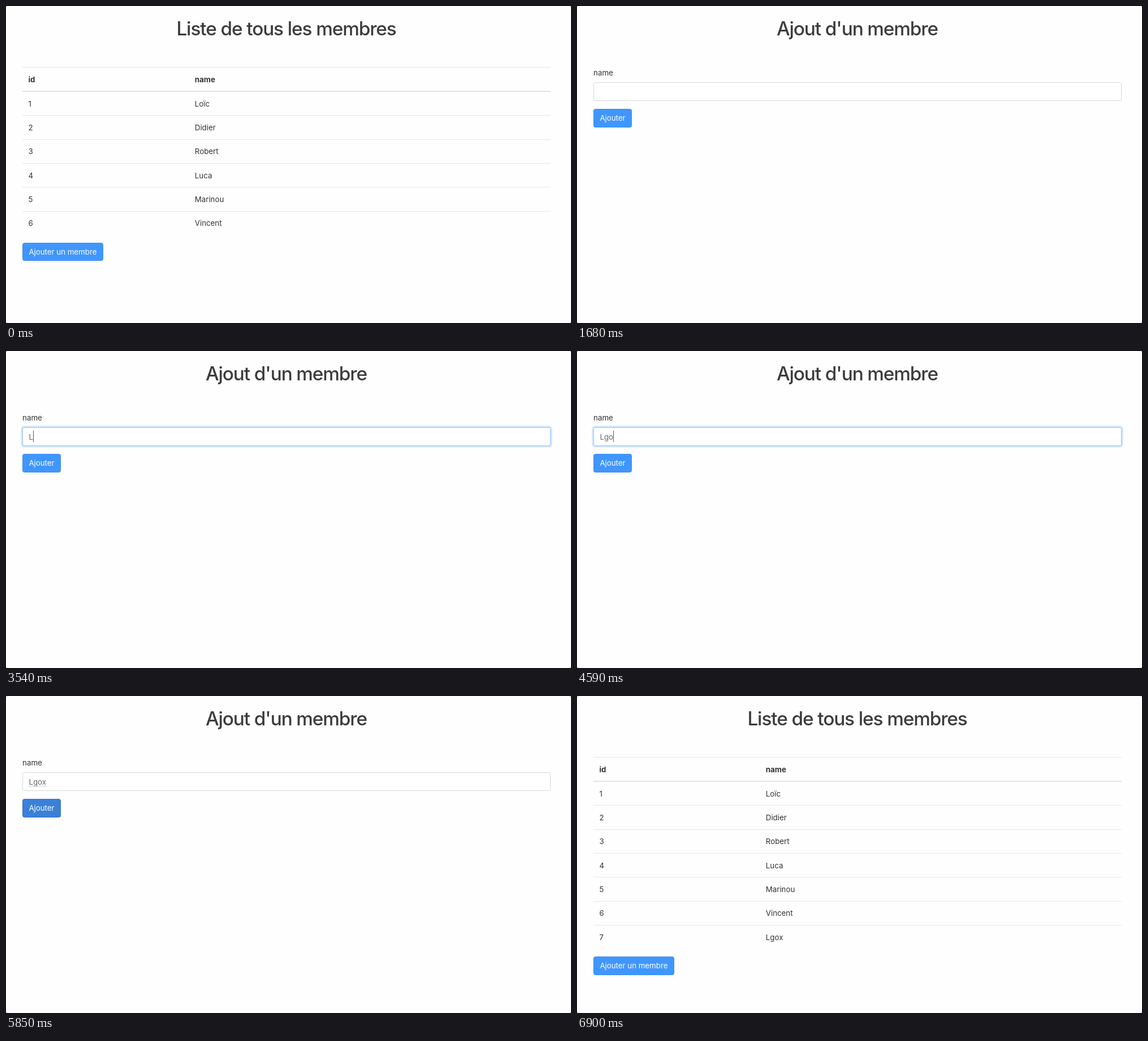
Animation of 999x561 px, one loop 7530 ms. Source, as an HTML page:

```html
<!DOCTYPE html>
<html lang="fr">
<head>
<meta charset="utf-8">
<title>Membres</title>
<style>
  html, body { margin: 0; width: 100%; height: 100%; overflow: hidden; background: #8c8c8c; }
  #stage {
    position: absolute; left: 0; top: 0; width: 999px; height: 561px;
    overflow: hidden; border-radius: 3px; background: #fefefe; color: #333;
    font: 13.35px/20px Inter, "Open Sans", sans-serif;
    font-optical-sizing: none; letter-spacing: -0.03px; white-space: pre;
  }
  #stage div, #stage i { position: absolute; box-sizing: border-box; }
  .title {
    left: 0; top: 20px; width: 991px; text-align: center; color: #3c3c3e;
    font-size: 33.35px; font-weight: 500; line-height: 40px; letter-spacing: -1.1px;
  }
  .bold { font-weight: 700; }
  .rule { left: 29px; width: 934px; height: 1px; background: #e4e6e8; }
  .button {
    left: 29px; height: 32.8px; border: 1px solid; border-radius: 3.5px;
    padding-left: 10.4px; line-height: 31.4px; color: #fff;
  }
  #field {
    left: 29px; top: 135.4px; width: 934px; height: 32.8px;
    border: 1px solid; border-radius: 3.5px; background: #fff;
  }
  #typed { left: 40.4px; top: 142px; color: #65686b; }
  #caret { left: 100%; top: -1px; width: 1px; height: 20px; background: #555; }
  #dots { left: 0; right: 0; top: 17px; height: 1px; border-top: 1px dotted #999; }
</style>
</head>
<body>
<div id="stage"></div>
<script>
const LOOP = 7530, STEP = 30, ROW = 42.33;
const FORM_OPENS = 1680, FORM_SENT = 5880;
const HOVER_LIST = 1050, HOVER_FORM = 5580, FOCUS = 2640, BLUR = 5700, FADE = 150;
const WORD = "Lgox";
const KEYS = [3540, 3960, 4170, 4770];
const CARET_ON = [[2640, 3120], [3540, 4680], [4770, 5250]];
const NAMES = ["Loïc", "Didier", "Robert", "Luca", "Marinou", "Vincent", WORD];
const BLUE = [[64, 150, 255], [58, 128, 217]];
const BLUE_EDGE = [[61, 142, 242], [53, 117, 200]];
const FIELD_EDGE = [[211, 214, 218], [156, 196, 245]];

const stage = document.getElementById("stage");

function add(parent, className, text = "", style = {}) {
  const el = document.createElement("div");
  el.className = className;
  el.textContent = text;
  Object.assign(el.style, style);
  parent.append(el);
  return el;
}

const label = (parent, text, x, middle, className = "") =>
  add(parent, className, text, { left: x + "px", top: middle - 10 + "px" });

const rule = (parent, y, height = 1, background = "") =>
  add(parent, "rule", "", { top: y + "px", height: height + "px", background });

// List page
const list = add(stage, "");
add(list, "title", "Liste de tous les membres");
rule(list, 108);
label(list, "id", 39.4, 129.7, "bold");
label(list, "name", 333.8, 129.7, "bold");
rule(list, 150, 2, "#e1e3e6");
const rows = NAMES.map((name, i) => {
  const row = add(list, "");
  if (i) rule(row, Math.round(151.1 + i * ROW));
  label(row, String(i + 1), 39.4, 172.8 + i * ROW);
  label(row, name, 333.8, 172.8 + i * ROW);
  return row;
});
const openButton = add(list, "button", "Ajouter un membre", { width: "142.6px" });

// Form page
const form = add(stage, "");
add(form, "title", "Ajout d'un membre");
label(form, "name", 29.1, 118.4);
const field = add(form, "");
field.id = "field";
const typed = add(form, "");
typed.id = "typed";
const word = document.createElement("span");
const caret = document.createElement("i");
caret.id = "caret";
const dots = document.createElement("i");
dots.id = "dots";
typed.append(word, caret, dots);
typed.style.height = "20px";
const sendButton = add(form, "button", "Ajouter", { top: "182.1px", width: "67.8px" });

// Smooth fade from 0 to 1 after a start time
function fade(t, start) {
  const k = Math.min(1, Math.max(0, (t - start) / FADE));
  return k * k * (3 - 2 * k);
}

const mix = ([a, b], k) =>
  `rgb(${a.map((v, i) => Math.round(v + (b[i] - v) * k)).join(",")})`;

function paintButton(el, hover) {
  el.style.backgroundColor = mix(BLUE, hover);
  el.style.borderColor = mix(BLUE_EDGE, hover);
}

function drawList(t) {
  const saved = t >= FORM_SENT;
  rows[rows.length - 1].style.display = saved ? "" : "none";
  openButton.style.top = 418.5 + (saved ? ROW : 0) + "px";
  paintButton(openButton, saved ? 0 : fade(t, HOVER_LIST));
}

function drawForm(t) {
  const count = KEYS.filter(key => t >= key).length;
  word.textContent = WORD.slice(0, count);
  caret.style.height = count ? "20px" : "21px";
  caret.style.display = CARET_ON.some(([from, to]) => t >= from && t < to) ? "" : "none";
  dots.style.display = t >= BLUR ? "" : "none";

  // The ring shows up late, partway through its fade
  const focus = t < FOCUS + 90 ? 0 : fade(t, FOCUS) - fade(t, BLUR);
  field.style.borderColor = mix(FIELD_EDGE, focus);
  field.style.boxShadow = `0 0 0 2.6px rgba(64,150,255,${0.25 * focus})`;
  paintButton(sendButton, fade(t, HOVER_FORM));
}

function draw(now) {
  const t = Math.floor((now % LOOP) / STEP) * STEP;
  const onForm = t >= FORM_OPENS && t < FORM_SENT;
  list.style.display = onForm ? "none" : "";
  form.style.display = onForm ? "" : "none";
  if (onForm) drawForm(t);
  else drawList(t);
}

const start = performance.now();
function tick() {
  draw(performance.now() - start);
  requestAnimationFrame(tick);
}
tick();
</script>
</body>
</html>
```
